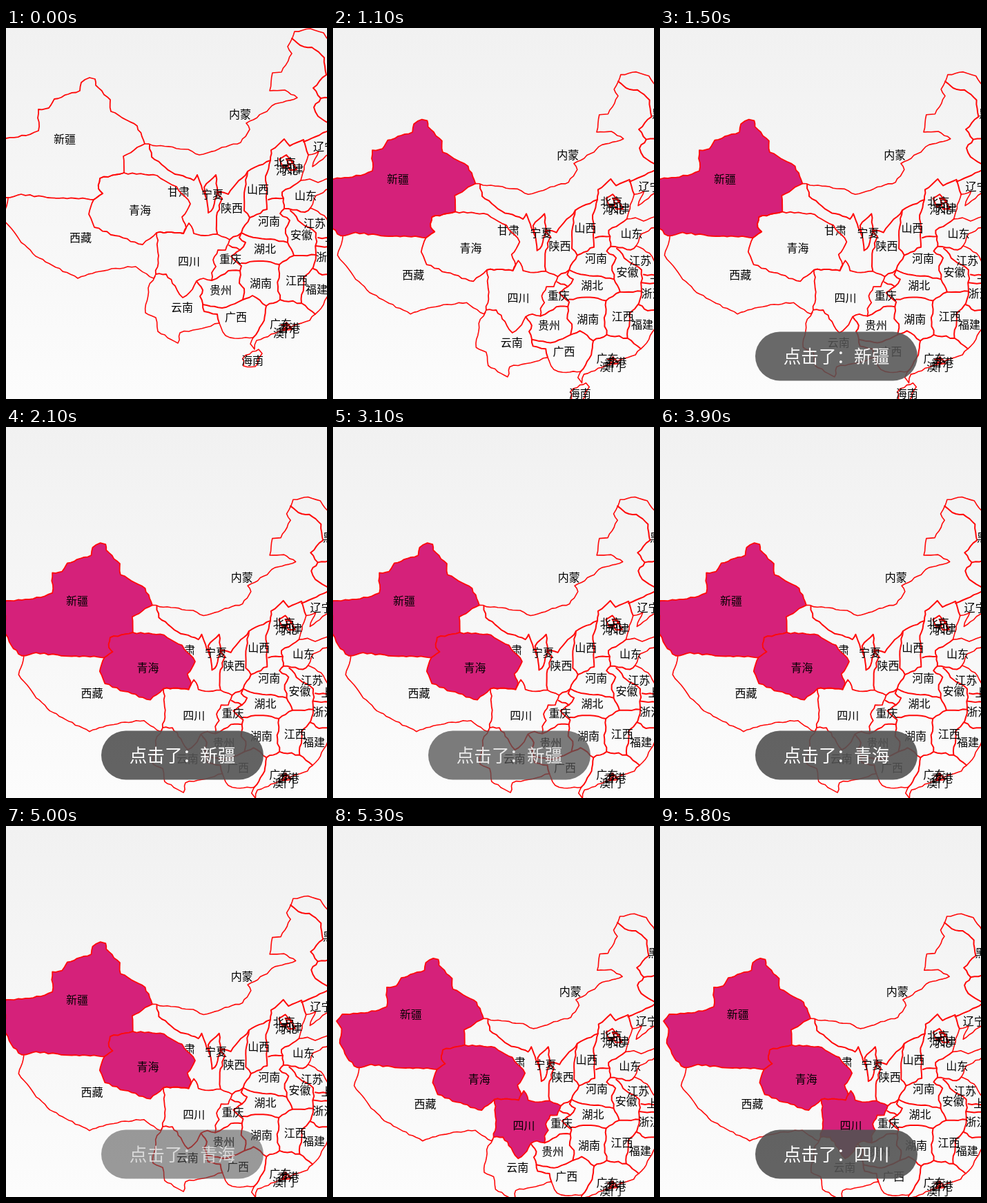
An HTML page with a canvas that plays this animation: 465x538 px, repeating every 7000 ms.

```html
<!DOCTYPE html>
<html lang="zh-CN">
<head>
<meta charset="utf-8">
<style>
html, body { margin: 0; width: 100%; height: 100%; overflow: hidden; background: #f7f7f7; }
canvas { display: block; }
</style>
</head>
<body>
<canvas id="stage" width="465" height="538"></canvas>
<script>
const WIDTH = 465, HEIGHT = 538, LOOP = 7000;
const RED = '#ff0a0a', PINK = '#d5217a';
const FONT = '"Noto Sans CJK SC", "Noto Sans CJK", "Noto Sans", sans-serif';
const ctx = document.getElementById('stage').getContext('2d');

let seed = 7;
function random() {
  seed = (seed * 16807) % 2147483647;
  return seed / 2147483647;
}

// Turns a few key points into a naturally rough border
function border(keys) {
  const points = keys.split(' ').map(pair => pair.split(',').map(Number));
  const rough = [points[0]];
  for (let i = 1; i < points.length; i++) {
    const [x0, y0] = points[i - 1], [x1, y1] = points[i];
    const dx = x1 - x0, dy = y1 - y0, length = Math.hypot(dx, dy);
    const steps = Math.max(1, Math.round(length / 6));
    for (let k = 1; k < steps; k++) {
      const t = k / steps, shift = (random() - .5) * 2.6 / length;
      rough.push([x0 + dx * t - dy * shift, y0 + dy * t + dx * shift]);
    }
    rough.push(points[i]);
  }
  return rough;
}

const toPath = points => new Path2D('M' + points.join(' '));

// Borders of the provinces that can be picked
const xjRim = border('0,246 -13,235 -28,207 -25,184 -33,172 -24,161 0,160 29,156 47,149 47,118 62,116 70,103 90,96 107,91 109,79 121,72 129,74 130,83 151,104 152,121 190,142 201,168');
const xjGansu = border('201,168 170,186 171,210');
const xjQinghai = border('171,210 136,218 134,233 140,240 127,249');
const xjTibet = border('127,249 100,247 60,246 22,241 0,246');
const qhGansu = border('171,210 219,214 247,230 267,255 255,274 261,290 257,298');
const qhSichuan = border('257,298 234,296 218,297');
const qhTibet = border('218,297 198,314 158,301 128,289 120,270 127,249');
const scTibet = border('218,297 221,330 217,357');
const scYunnan = border('217,357 232,357 245,374 256,391 270,379 276,367');
const scEast = border('276,367 286,363 298,366 298,355 304,346 300,336 307,322 318,322 324,307');
const scGansu = border('324,307 306,299 288,301 272,298 265,283 257,298');

const pickable = {
  新疆: toPath([...xjRim, ...xjGansu, ...xjQinghai, ...xjTibet]),
  青海: toPath([...qhGansu, ...qhSichuan, ...qhTibet, ...xjQinghai.slice().reverse()]),
  四川: toPath([...scTibet, ...scYunnan, ...scEast, ...scGansu, ...qhSichuan])
};

const paths = list => list.trim().split('\n').map(keys => toPath(border(keys.trim())));

const north = paths(`
  208,169 211,187 240,209 272,221 277,213 289,244
  289,244 287,231 304,213 306,238 300,261 293,268 289,244
  306,238 313,247 305,273 306,298
  306,238 322,241 350,208 383,192
  350,208 345,245 345,265 353,275 341,297 324,307
  383,192 376,215 378,263 353,275
  380,249 402,247 400,238 427,221
  383,192 384,177 403,161 411,171 431,162 438,184
  431,165 459,152 474,144
  414,15 426,25 443,28 461,43 464,68 445,87 456,102 446,115 452,128 474,142
  456,102 474,99
  396,190 406,184 417,194 402,203 396,190
  412,191 421,206 411,206 406,190 412,191`);

const south = paths(`
  402,247 403,262 397,269 411,279 405,291 408,311
  403,262 433,267 441,261
  412,265 428,283 449,297 449,329
  452,304 476,306
  449,316 474,317
  341,297 352,302 408,311 417,330 449,329
  341,297 338,304 347,311 339,322 326,331 341,345 339,352
  323,315 339,322
  417,330 396,343 372,338 341,341
  396,343 394,375 397,394 377,403
  298,366 311,359 322,352 339,352 338,370 345,378 343,394
  276,367 285,380 281,389 287,411 306,415 309,428
  285,401 313,406 343,394 357,388 377,403 374,424 358,449
  449,329 445,347 431,363 428,399
  445,349 458,358 474,357
  397,394 428,399 448,415
  399,431 408,432 400,437 414,437 406,427 402,434`);

const coast = paths(`
  201,168 264,176 280,184 324,170 340,166 353,147 348,138 378,121 390,110 422,101 404,90 382,91 386,65 399,64 414,37 408,27 415,14 418,5 441,1 460,7 474,28
  3,247 -5,275 8,291 22,311 43,331 72,347 104,363 130,354 153,349 188,346 214,363 217,357
  216,360 206,377 202,413 217,420 220,440 249,457 252,442 290,434 309,428
  309,428 318,446 331,450 358,449 354,458 360,466 363,453 395,440 440,424 460,401 474,374
  438,184 432,200 427,221 440,219 452,224 474,215
  438,184 453,179 444,201 474,179
  474,230 449,243 441,261 461,272 474,292
  343,479 357,469 366,466 371,472 361,491 344,490 343,479`);

const labels = `新疆 84 162|西藏 107 305|内蒙 338 126|甘肃 249 238|宁夏 298 242|陕西 326 262
山西 364 235|河南 380 281|山东 433 244|河北 406 207|北京 403 196|天津 414 205|辽宁 460 173
黑龙江 488 64|江苏 446 284|安徽 427 301|上海 477 304|浙江 464 333|福建 449 380|江西 420 367
湖北 374 321|湖南 368 371|重庆 324 336|贵州 310 381|广西 332 420|云南 254 406|广东 397 430
香港 409 436|澳门 402 443|海南 356 483|青海 193 265|四川 264 339`
  .split(/[|\n]/).map(entry => {
    const [name, x, y] = entry.split(' ');
    return { name, x: +x, y: +y };
  });

// Each click picks a province and shrinks the map a little
const clicks = [
  { name: '新疆', time: 1100, x: 11.4, y: 62.7, show: 1200, hide: 3000 },
  { name: '青海', time: 2100, x: 23, y: 100.5, show: 3500, hide: 4800 },
  { name: '四川', time: 5300, x: 35.2, y: 126.4, show: 5400, hide: Infinity }
];

const background = ctx.createLinearGradient(0, 0, 0, HEIGHT);
background.addColorStop(0, '#f1f1f1');
background.addColorStop(1, '#fcfcfc');

function drawText(text, x, y, size, weight, color) {
  ctx.font = `${weight} ${size}px ${FONT}`;
  ctx.textAlign = 'center';
  ctx.fillStyle = color;
  ctx.fillText(text, x, y + size * .38);
}

function drawMap(done) {
  const { x, y } = done.at(-1) || { x: 0, y: 0 };
  const scale = 1 - .03 * done.length;

  const onMap = draw => {
    ctx.save();
    ctx.setTransform(scale, 0, 0, scale, x, y);
    draw();
    ctx.restore();
  };
  const stroke = (path, width) => {
    ctx.lineWidth = width / scale;
    ctx.stroke(path);
  };
  const drawLabel = label =>
    drawText(label.name, label.x * scale + x + 1, label.y * scale + y - 1, 16, 500, '#000');
  const isBelow = label => label.name === '甘肃';

  ctx.strokeStyle = RED;
  ctx.lineJoin = ctx.lineCap = 'round';
  onMap(() => {
    coast.forEach(path => stroke(path, 1.6));
    [...north, ...south].forEach(path => stroke(path, 2));
  });
  // Gansu's label lies below the filled Qinghai
  labels.filter(isBelow).forEach(drawLabel);
  onMap(() => {
    ctx.fillStyle = PINK;
    for (const [name, path] of Object.entries(pickable)) {
      if (done.some(click => click.name === name)) ctx.fill(path);
      stroke(path, 1.8);
    }
  });
  labels.filter(label => !isBelow(label)).forEach(drawLabel);
}

// Fades advance in steps of 100 ms, five per fade
function toastAlpha({ show, hide }, time) {
  const progress = start => Math.min(1, (Math.floor((time - start) / 100) + 1) / 5);
  if (time < show) return 0;
  if (time >= hide) return 1 - progress(hide) ** 2;
  return 1 - (1 - progress(show)) ** 2;
}

function drawToast(name, alpha) {
  ctx.save();
  ctx.globalAlpha = alpha * .9;
  ctx.fillStyle = '#535353';
  ctx.beginPath();
  ctx.roundRect(138, 440.5, 235, 71, 35.5);
  ctx.fill();
  ctx.globalAlpha = alpha;
  drawText('点击了：' + name, 255.5, 476, 25.6, 400, '#fff');
  ctx.restore();
}

function render(time) {
  ctx.fillStyle = background;
  ctx.fillRect(0, 0, WIDTH, HEIGHT);
  drawMap(clicks.filter(click => time >= click.time));
  for (const click of clicks) {
    const alpha = toastAlpha(click, time);
    if (alpha > 0) drawToast(click.name, alpha);
  }
}

const start = performance.now();
function tick() {
  render((performance.now() - start) % LOOP);
  requestAnimationFrame(tick);
}
tick();
</script>
</body>
</html>
```
